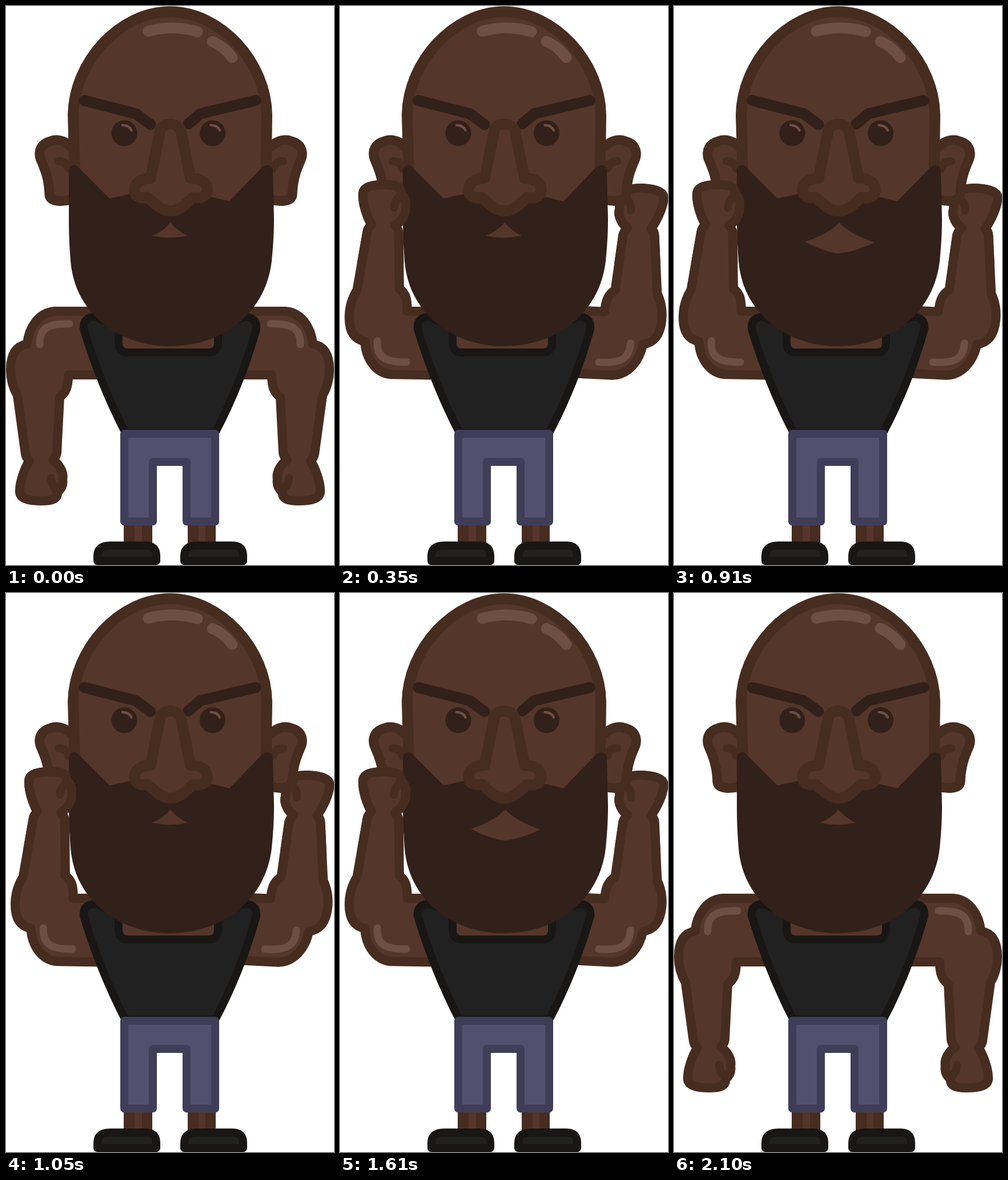
Recreate the animation shown at these times as an HTML page. Size 574 by 976 pixels, loop 2450 ms.

```html
<!DOCTYPE html>
<html lang="en">
<head>
<meta charset="utf-8">
<title>Flexing strongman</title>
<style>
  html, body { margin: 0; width: 100%; height: 100%; overflow: hidden; background: #fff; }
  svg { display: block; width: 100%; height: 100%; }
  path, circle { stroke-linejoin: round; stroke-linecap: round; }
  .skin { fill: #55362a; stroke: #472c20; }
  .fold { fill: none; stroke: #472c20; stroke-width: 14; }
  .shine { fill: none; stroke: #6d4f43; }
  .hair { fill: #32201a; }
  .brow { fill: none; stroke: #32201a; stroke-width: 19; }
  .black { fill: #212121; stroke: #181716; stroke-width: 14; }
  .pants { fill: #53506f; stroke: #403d59; stroke-width: 14; }
</style>
</head>
<body>
<svg viewBox="0 0 574 976">
  <defs>
    <g id="arm">
      <path class="skin" stroke-width="16" d="M160 533H85C58 535 40 560 37 590C15 594 8 612 8 635C8 655 13 668 20 680L34 782Q35 789 41 794C33 806 24 830 24 846C23 860 40 864 62 864C78 864 91 862 90 849C97 843 101 836 99 826C102 815 93 799 82 793Q88 787 89 780L94 683C104 676 109 667 109 644H160"/>
      <path class="fold" d="M79 824Q80 842 94 845"/>
      <path class="shine" stroke-width="13" d="M59 591C58 562 75 554 111 555"/>
    </g>
    <g id="downArms">
      <use href="#arm"/>
      <use href="#arm" transform="matrix(-1 0 0 1 574 0)"/>
    </g>
    <!-- Raised arms are flipped upside down and slightly slanted. -->
    <g id="upArms">
      <use href="#arm" transform="matrix(1 .015 .038 -1 -16 1175)"/>
      <use href="#arm" transform="matrix(1 .05 .09 -.99 -60 1148) matrix(-1 0 0 1 574 0)"/>
    </g>
    <g id="ear">
      <path class="skin" stroke-width="17" d="M114 246C100 232 86 233 78 236C62 240 56 252 60 266C68 285 75 300 76 330C78 342 98 342 114 338"/>
      <path class="fold" d="M92 271Q106 271 109 284"/>
    </g>
    <g id="eye">
      <circle class="hair" cx="207" cy="222" r="22.5"/>
      <path class="shine" stroke-width="4.5" d="M204 208Q215 208 219.500 217"/>
    </g>
    <path id="shoe" class="black" d="M160 969V960Q160 942 182 942H245Q263 942 263 960V969Z"/>
    <clipPath id="fists"><rect width="574" height="450"/></clipPath>
  </defs>

  <use href="#downArms" class="down"/>
  <use href="#upArms" class="up"/>

  <path fill="#472c20" d="M206 900h50v40h-50zM318 900h49v40h-49z"/>
  <path fill="#55362a" d="M225 900h13v40h-13zM337 900h12v40h-12zM192 540h184v64h-184z"/>
  <use href="#shoe"/>
  <use href="#shoe" x="152"/>
  <path class="black" d="M157 543Q134 543 136 564Q165 660 209 745H366Q411 660 438 564Q440 543 417 543L371 560V588Q371 605 354 605H214Q197 605 197 588V560Z"/>
  <path class="pants" d="M207 747H366V900H316V796H257V900H207Z"/>

  <use href="#ear"/>
  <use href="#ear" transform="matrix(-1 0 0 1 577 0)"/>
  <path class="skin" stroke-width="19" d="M123 380L117.500 190C119 98 198 10 287 10S455 98 456.500 190L454 380Z"/>
  <path class="shine" stroke-width="19" d="M249 44Q293 32 335 45M361 62Q381 70 396 90"/>
  <path class="hair" d="M110 290Q110 278 120 278Q124 278 128 283L181 336L218 328L362 334L391 341L447 283Q453 278 458 278Q467 279 467 290L469 372C469 400 467 425 465 445C455 535 380 594 287 594C195 594 120 535 113 445C111 420 110 400 110 372Z"/>
  <path class="brow" d="M137 165L227 188L253 207M437 165L340 188L319 206"/>
  <use href="#eye"/>
  <use href="#eye" x="154.500"/>
  <path class="skin" stroke-width="19" d="M287 206C275 206 270 213 269 222L253 301C238 300 225 308 225 321C225 333 235 337 248 334C258 342 270 358 288 358C306 358 318 342 328 334C341 337 352 333 352 321C352 308 339 300 323 301L307 222C306 213 299 206 287 206Z"/>
  <path id="mouth" fill="#55362a"/>

  <g class="up" clip-path="url(#fists)"><use href="#upArms"/></g>
</svg>
<script>
  const STEP = 350, STEPS = 7;
  const CLOSED = 'M255 401Q275 394 288 378Q300 393 318 401Q287 408 255 401Z';
  const OPEN = 'M229 412C255 403 275 393 289 378C303 393 325 404 351 413C335 420 315 429 289 432C270 431 250 422 229 412Z';
  const mouth = document.getElementById('mouth');
  const show = (selector, visible) => document.querySelectorAll(selector)
    .forEach(el => el.style.display = visible ? '' : 'none');

  function draw(time) {
    const step = Math.floor(time / STEP) % STEPS;
    const raised = step > 0 && step < STEPS - 1;
    show('.up', raised);
    show('.down', !raised);
    mouth.setAttribute('d', step === 2 || step === 4 ? OPEN : CLOSED);
  }

  const start = performance.now();
  function tick() {
    draw(performance.now() - start);
    requestAnimationFrame(tick);
  }
  tick();
</script>
</body>
</html>
```
